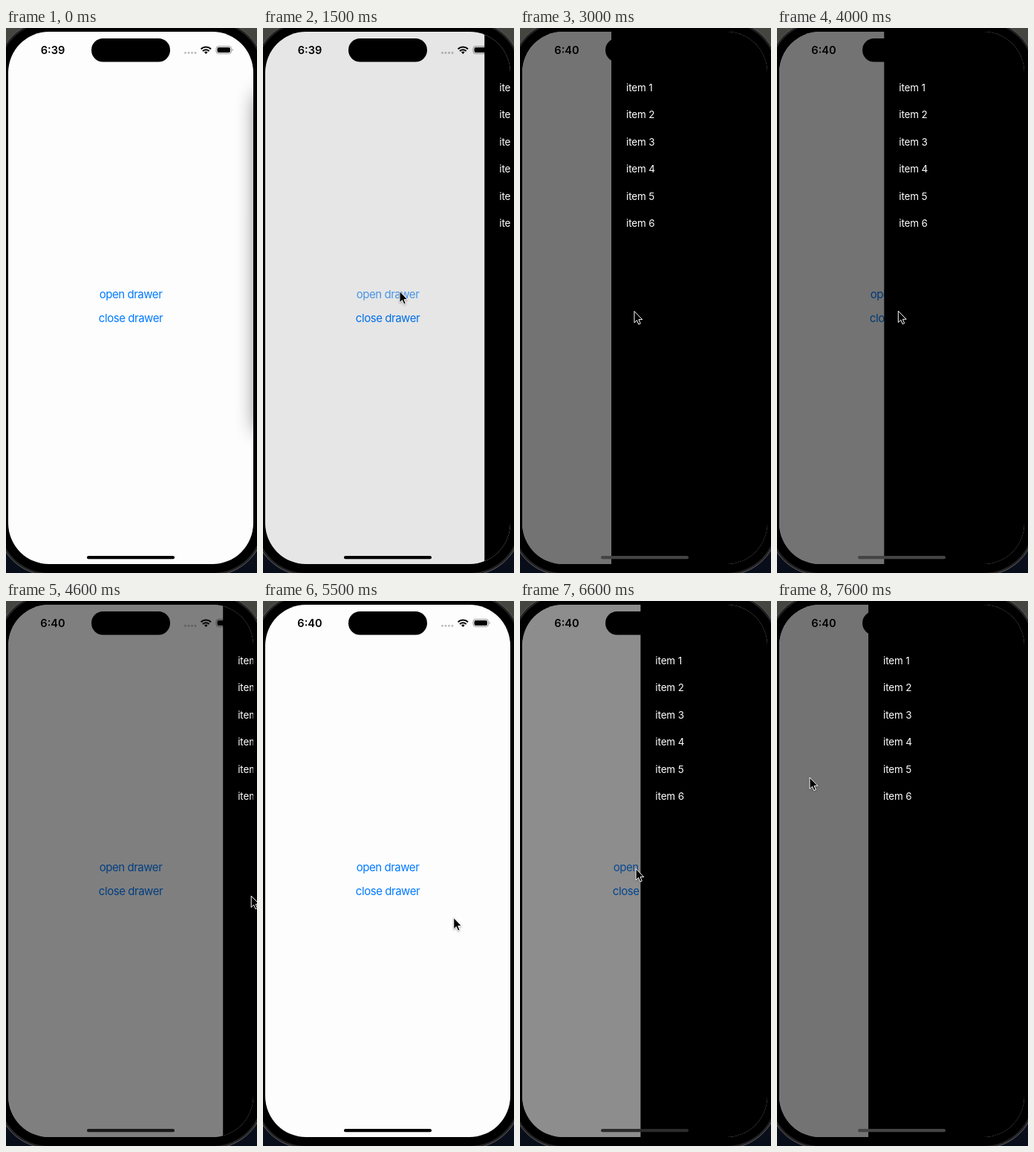
An HTML page for the animation above (8 s loop, 338 by 732 pixels).

```html
<!DOCTYPE html>
<html lang="en">
<head>
<meta charset="utf-8">
<title>Drawer demo</title>
<style>
  html, body { margin: 0; width: 100%; height: 100%; overflow: hidden; background: #000; }
  svg { display: block; width: 338px; height: 732px; font-family: Inter, "Liberation Sans", sans-serif; }
  .button { font-size: 15px; letter-spacing: -.45px; fill: #007aff; text-anchor: middle; }
  .item { font-size: 13.4px; letter-spacing: -.1px; fill: #fff; }
  #clock { font-size: 14.6px; font-weight: 600; text-anchor: middle; }
  #shade { filter: blur(14px); }
</style>
</head>
<body>
<svg viewBox="0 0 338 732">
  <defs>
    <linearGradient id="desk" x2="0" y2="1">
      <stop offset="0" stop-color="#45463f"/>
      <stop offset=".5" stop-color="#222"/>
      <stop offset="1" stop-color="#080d1a"/>
    </linearGradient>
    <clipPath id="screen"><rect x="3" y="5" width="330" height="715" rx="55"/></clipPath>
  </defs>

  <!-- device body -->
  <rect width="338" height="732" fill="url(#desk)"/>
  <rect x="-12" y="-10" width="360" height="745" rx="70" fill="#232324" stroke="#5a5a5c"/>
  <rect x="-9" y="-7" width="354" height="739" rx="67"/>

  <g clip-path="url(#screen)">
    <rect width="338" height="732" fill="#fdfdfd"/>
    <text id="open" class="button" x="168" y="362.5">open drawer</text>
    <text class="button" x="168" y="394.5">close drawer</text>

    <!-- status bar -->
    <text id="clock" x="63" y="35"></text>
    <rect x="115" y="14" width="106" height="31.5" rx="15.7"/>
    <path d="M241.5 33.2h14" stroke="#000" stroke-opacity=".26" stroke-width="3" stroke-linecap="round" stroke-dasharray="0 4.5"/>
    <g fill="none" stroke="#000" stroke-width="2.1">
      <path d="M262.6 28.2a9.6 9.6 0 0 1 13.4 0M265 31a6.2 6.2 0 0 1 8.6 0"/>
      <path d="M269.3 35l-2.3-2.4a3.4 3.4 0 0 1 4.6 0z" fill="#000" stroke="none"/>
    </g>
    <rect x="283" y="24.5" width="20.5" height="10" rx="3.2" fill="none" stroke="#000" stroke-opacity=".4"/>
    <rect x="284.5" y="26" width="17.5" height="7" rx="2"/>
    <path d="M304.7 27.8q2.2 1.7 0 3.4z" opacity=".45"/>

    <rect id="shade" x="338" y="90" width="120" height="450"/>
    <rect id="overlay" width="338" height="732"/>
    <g id="drawer"><rect width="230" height="732"/></g>
    <rect id="bar" x="109" y="709" width="118" height="4.3" rx="2.1"/>
  </g>

  <path id="cursor" d="M0 0V15.4L3.5 12.1 5.8 17.6 8.3 16.5 6 11.2H10.8Z" stroke="#fff" stroke-linejoin="round"
        style="filter:drop-shadow(0 1px 1px #0005)"/>
</svg>

<script>
const $ = id => document.getElementById(id);
const LOOP = 8000, CLOSED = 333, WIDTH = 210, DIM = .545;

for (let i = 0; i < 6; i++)
  $('drawer').insertAdjacentHTML('beforeend',
    `<text class="item" x="20" y="${85 + i * 36.4}">item ${i + 1}</text>`);

const clamp = v => Math.min(1, Math.max(0, v));
const smooth = v => (v = clamp(v), v * v * (3 - 2 * v));

// Keys are [time, value, ...]; column c is interpolated linearly.
function track(keys, t, c = 1) {
  const i = keys.findIndex(k => k[0] > t);
  if (i < 0) return keys[keys.length - 1][c];
  if (i === 0) return keys[0][c];
  const a = keys[i - 1], b = keys[i];
  return a[c] + (b[c] - a[c]) * (t - a[0]) / (b[0] - a[0]);
}

const cursorKeys = [
  [250, 350, 440], [400, 334, 428], [700, 252, 390], [1000, 180, 355], [1100, 178, 354],
  [1200, 184, 353.5], [1900, 184, 353.5], [2200, 188, 374], [2400, 188, 374],
  [2800, 168, 381], [3300, 133, 379.5], [3700, 133, 379.5], [4000, 163, 380],
  [4300, 250, 386], [4600, 330, 396], [4700, 350, 402], [5000, 350, 432],
  [5100, 335, 431], [5500, 257, 425.5], [5800, 186, 380], [6000, 156, 359.5],
  [7000, 156, 359.5], [7200, 132, 330], [7400, 78, 270], [7600, 44, 237]];
const dragKeys = [[3750, 123], [3850, 124], [4000, 144], [4300, 222], [4600, 292], [4800, CLOSED]];
const dimKeys = [[4550, DIM], [4600, .5], [4700, .27], [4800, .09], [4900, 0]];
const pressKeys = [
  [950, 1], [1100, .2], [1350, .2], [1600, 1],
  [5950, 1], [6100, .2], [6330, .2], [6620, 1]];
const barKeys = [[1500, 0], [1750, 68], [4050, 68], [4600, 26], [4800, 0], [6430, 0], [6700, 68]];
const shadeKeys = [[0, .6], [100, .4], [200, .4], [300, .2], [500, 0]];

function draw(t) {
  const opening = smooth((t - (t < 5000 ? 1390 : 6290)) / 430);
  const dragging = t > 3750 && t < 5000;
  const x = dragging ? track(dragKeys, t) : t > 4900 && t < 6290 ? CLOSED : CLOSED - WIDTH * opening;

  $('drawer').setAttribute('transform', `translate(${x})`);
  $('overlay').setAttribute('opacity', dragging ? track(dimKeys, t) : DIM * opening);
  $('open').setAttribute('opacity', track(pressKeys, t));
  $('shade').setAttribute('opacity', track(shadeKeys, t));
  const g = track(barKeys, t);
  $('bar').setAttribute('fill', `rgb(${g},${g},${g})`);
  $('clock').textContent = t < 2900 ? '6:39' : '6:40';
  $('cursor').setAttribute('transform', `translate(${track(cursorKeys, t)} ${track(cursorKeys, t, 2)})`);
}

const start = performance.now();
function tick() {
  draw((performance.now() - start) % LOOP);
  requestAnimationFrame(tick);
}
tick();
</script>
</body>
</html>
```
